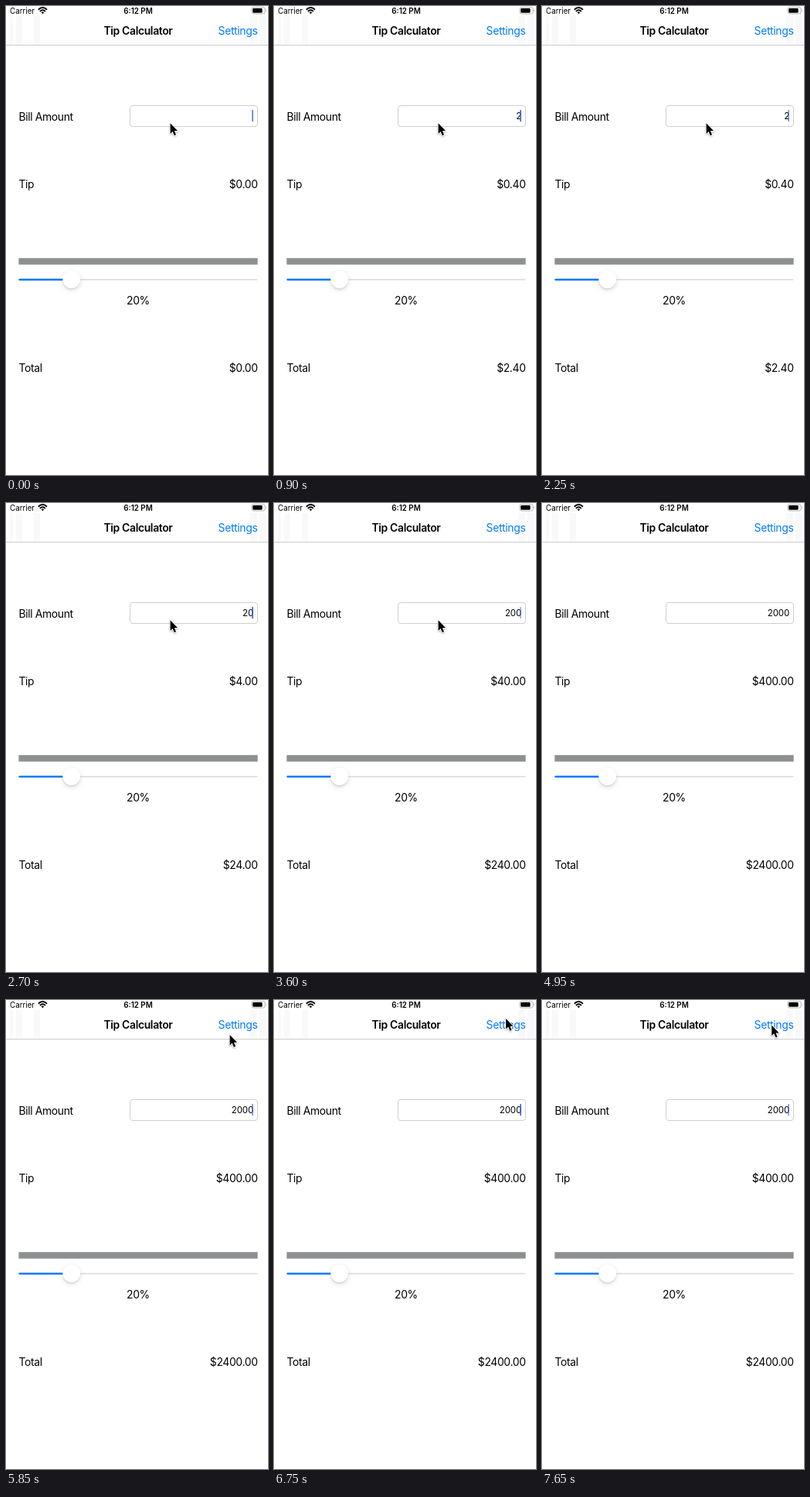
Write an HTML page that moves like this. It is 339x605 px and loops after 8000 ms.

```html
<!DOCTYPE html>
<html lang="en">
<head>
<meta charset="utf-8">
<title>Tip Calculator</title>
<style>
  html, body { margin: 0; width: 100%; height: 100%; overflow: hidden; background: #fff; }
  svg { display: block; width: 339px; height: 605px; }
  text { font: 13.92px Inter, "Liberation Sans", sans-serif; letter-spacing: -.025em; fill: #000; }
  .title { font-weight: 600; }
  .status { font-size: 9.8px; letter-spacing: 0; }
  .field { font-size: 11.46px; letter-spacing: -.01em; }
  .link { fill: #007aff; }
  .end { text-anchor: end; }
  .mid { text-anchor: middle; }
  .thumb { filter: drop-shadow(0 2.5px 3px rgba(0, 0, 0, .15)) drop-shadow(0 2.5px .5px rgba(0, 0, 0, .06)); }
  #cursor { filter: drop-shadow(0 1px .8px rgba(0, 0, 0, .3)); }
</style>
</head>
<body>
<svg viewBox="0 0 339 605">
  <!-- navigation bar -->
  <path d="M5 13h4v37h-4zM13 13h8v37h-8zM36 13h8v37h-8zM316 13h9v37h-9zM328 13h9v37h-9z" fill="#f9f9f9"/>
  <path d="M0 50.5H339" stroke="#cdcdcd"/>
  <text class="title mid" x="171" y="37.4">Tip Calculator</text>
  <text class="link end" x="325.4" y="37.4">Settings</text>

  <!-- status bar -->
  <text class="status" x="5" y="10">Carrier</text>
  <text class="status title mid" x="171" y="10">6:12 PM</text>
  <g fill="none" stroke="#000" stroke-width="1.9">
    <path d="M41.8 4.7Q47.4 -.5 53 4.7M43.9 7Q47.4 3.7 50.9 7"/>
    <path d="M47.4 10.3L45.5 8.3Q47.4 6.7 49.3 8.3Z" fill="#000" stroke="none"/>
  </g>
  <rect x="317.9" y="1.7" width="17.3" height="8.4" rx="2.3" fill="none" stroke="#a3a3a3" stroke-width=".8"/>
  <rect x="319.2" y="3" width="12.4" height="5.8" rx="1.2"/>
  <path d="M336.2 4.5q1.5 1.4 0 2.8z" fill="#a3a3a3"/>

  <!-- form -->
  <text x="16.4" y="147.9">Bill Amount</text>
  <rect x="160.5" y="128.5" width="165" height="27" rx="3.5" fill="#fff" stroke="#cecece"/>
  <text class="field end" id="bill" x="320" y="146"></text>
  <rect id="caret" x="318.2" y="134" width="1.7" height="15.2" rx=".6" fill="#3f63e6"/>
  <text x="16.4" y="235.3">Tip</text>
  <text class="end" id="tip" x="325.6" y="235.3"></text>
  <rect x="16.4" y="325.2" width="309.2" height="8.4" fill="#8e8f91"/>
  <rect x="16.4" y="352" width="309.2" height="2" rx="1" fill="#e3e3e4"/>
  <rect x="16.4" y="351.8" width="68" height="2.4" rx="1.2" fill="#007aff"/>
  <circle class="thumb" cx="84.7" cy="352.8" r="11.4" fill="#fff"/>
  <text class="mid" x="171" y="384.8">20%</text>
  <text x="16.4" y="472.4">Total</text>
  <text class="end" id="total" x="325.6" y="472.4"></text>

  <g id="cursor">
    <path d="M2.6 .9V14.4L5.6 11.6L7.8 16.7L10 15.8L7.9 10.8H12Z"
          stroke="#fff" stroke-width="1.7" stroke-linejoin="round" paint-order="stroke"/>
  </g>
</svg>
<script>
const LOOP = 8000, RATE = 0.2;

// Each row: start time in ms, then the value held until the next row.
const bills = [[0, ''], [900, '2'], [2700, '20'], [3150, '200'], [4050, '2000']];
const carets = [
  [0, .85], [450, 0], [900, 1], [1800, 0], [2250, .7], [2700, 1], [3600, .55],
  [4050, 1], [4950, 0], [5400, .75], [6300, 1], [7650, .65]
];
const cursors = [
  [0, [210, 150.3]], [4500, null], [5400, [315.5, 59]], [5850, [287, 44]],
  [6300, [299, 27.5]], [6750, [297.5, 23]], [7200, [294, 32]], [7650, [294.6, 31.6]]
];

const el = id => document.getElementById(id);
const at = (rows, t) => rows.findLast(row => row[0] <= t)[1];
const money = n => '$' + n.toFixed(2);
const setText = (id, s) => { if (el(id).textContent !== s) el(id).textContent = s; };

function draw(t) {
  const bill = at(bills, t), pos = at(cursors, t);
  setText('bill', bill);
  setText('tip', money(bill * RATE));
  setText('total', money(bill * (1 + RATE)));
  el('caret').setAttribute('opacity', at(carets, t));
  el('cursor').setAttribute('visibility', pos ? 'visible' : 'hidden');
  if (pos) el('cursor').setAttribute('transform', `translate(${pos})`);
}

const start = performance.now();
function tick() {
  draw((performance.now() - start) % LOOP);
  requestAnimationFrame(tick);
}
tick();
</script>
</body>
</html>
```
